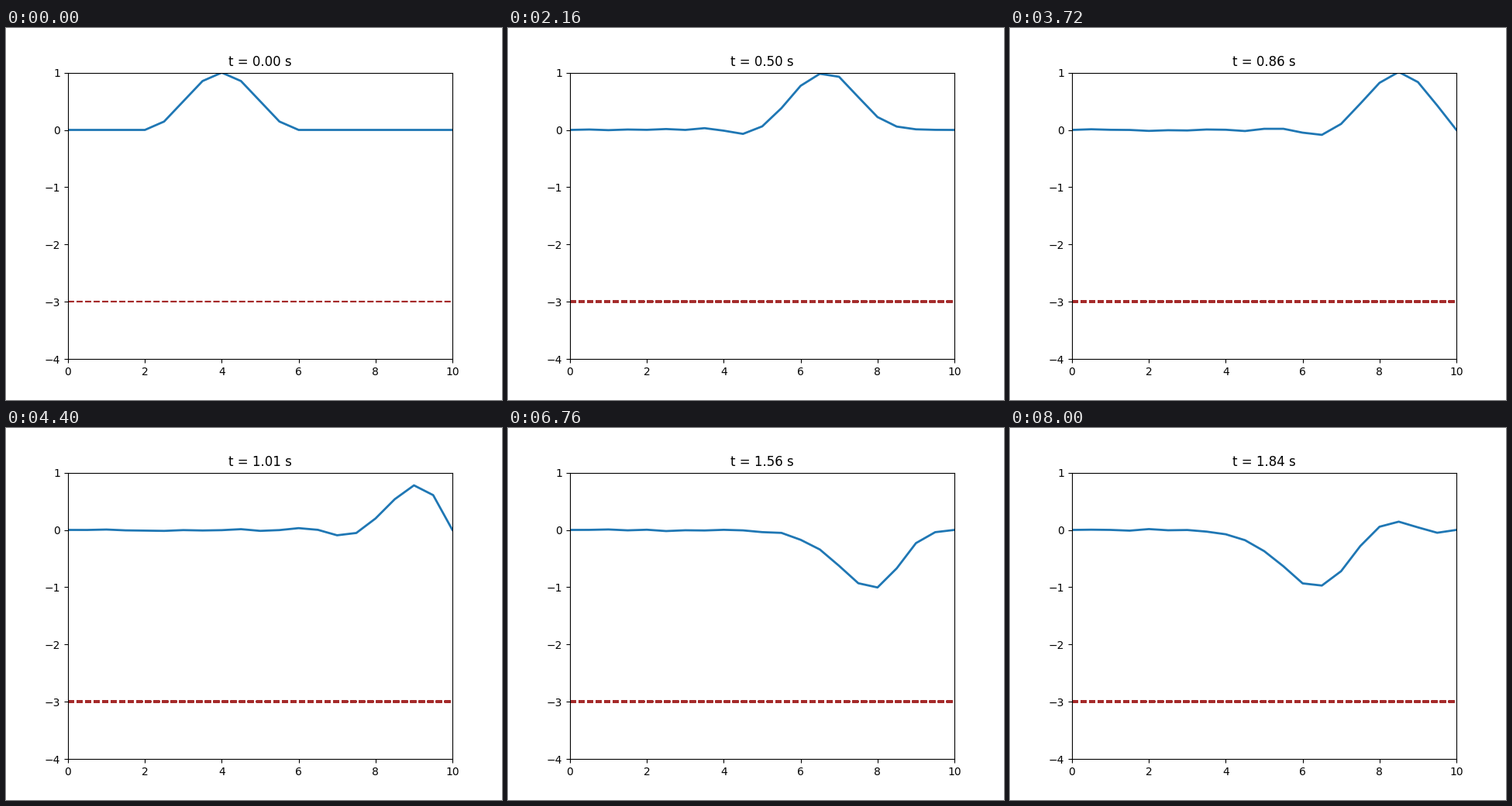
Recreate the animation shown at these times as a matplotlib script. Size 640x480 px, loop 8.04 s.

```python
import numpy as np
import matplotlib.pyplot as plt
from matplotlib.animation import FuncAnimation

G, DEPTH = 9.81, 3.0
LENGTH, NODES = 10.0, 21
STEPS, CFL = 200, 0.1
MAX_BEDS = 66  # the overdrawn bed line looks the same beyond this

x = np.linspace(0, LENGTH, NODES)
c = np.sqrt(G * DEPTH)
dt = CFL * (x[1] - x[0]) / c


def pulse(s):
    """Raised cosine of half-width 2 centred on x = 4."""
    return np.where(np.abs(s - 4) < 2, 0.5 * (1 + np.cos(np.pi * (s - 4) / 2)), 0.0)


def solve():
    """Leapfrog wave equation with fixed ends, pulse travelling right."""
    u = np.zeros((STEPS + 1, NODES))
    u[0] = pulse(x)
    u[1] = pulse(x - c * dt)
    for n in range(1, STEPS):
        lap = u[n, 2:] - 2 * u[n, 1:-1] + u[n, :-2]
        u[n + 1, 1:-1] = 2 * u[n, 1:-1] - u[n - 1, 1:-1] + CFL**2 * lap
    return u


waves = solve()

fig, ax = plt.subplots(figsize=(6.4, 4.8), dpi=100)
ax.set_xlim(0, LENGTH)
ax.set_ylim(-4, 1)
wave, = ax.plot(x, waves[0], color="C0", lw=2)
title = ax.set_title("t = 0.00 s")

# The bed is drawn once more at every step, so its soft edges build up.
beds = [ax.plot(x, np.full(NODES, -DEPTH), "--", color="brown", lw=1.5)[0]
        for _ in range(MAX_BEDS)]


def update(i):
    wave.set_ydata(waves[i])
    title.set_text(f"t = {i * dt:.2f} s")
    for k, bed in enumerate(beds):
        bed.set_visible(k < i + 2)
    return [wave, title, *beds]


anim = FuncAnimation(fig, update, frames=STEPS + 1, interval=40,
                     repeat=True, repeat_delay=0, blit=False)
plt.show()
```
